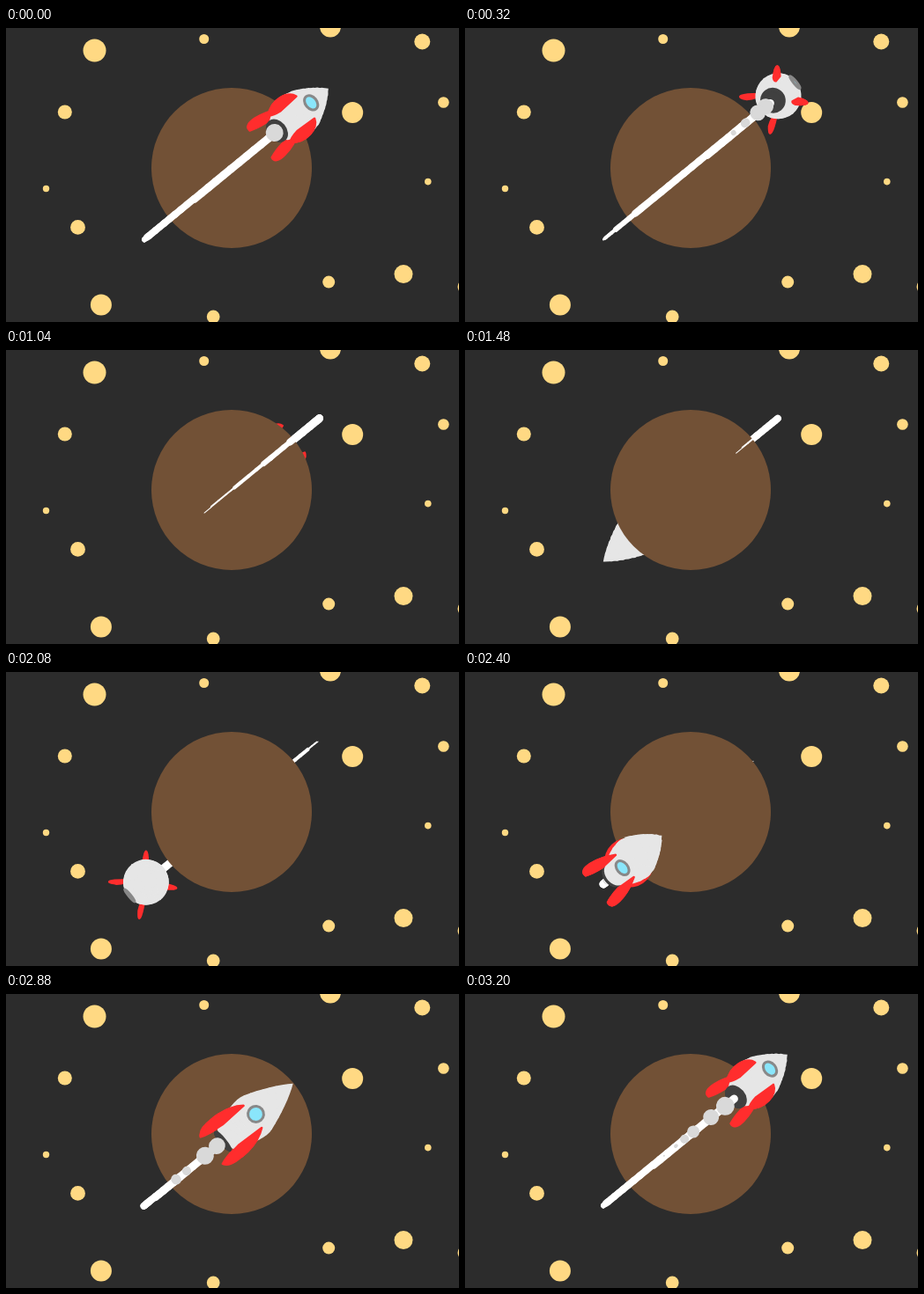
An HTML page without scripts for the animation above (3.24 s loop, 514 px wide and 334 px high).

```html
<!DOCTYPE html>
<html lang="en">
<head>
<meta charset="utf-8">
<title>Rocket orbit</title>
<style>
/* orbit angle in degrees: 0 = middle of the near side, 90 = upper right end */
@property --a { syntax: "<number>"; inherits: true; initial-value: 43.4; }
@keyframes orbit {
  from { --a: 43.4; }
  98.765%, to { --a: 403.4; }
}
html, body { margin: 0; width: 100%; height: 100%; overflow: hidden; background: #2c2c2c; }
.stage { position: relative; width: 514px; height: 334px; overflow: hidden; }
.stars { position: absolute; left: 0; top: 0; fill: #ffd983; }
.world {
  position: absolute; left: 256px; top: 158.5px; width: 0; height: 0;
  transform: rotate(-39.4deg);
  animation: orbit 3240ms linear infinite;
}
.world > * { position: absolute; }
.planet {
  left: -91.2px; top: -91.2px; width: 182.4px; height: 182.4px;
  border-radius: 50%; background: #725136; z-index: 0;
}

/* trail: capsules that lag behind the rocket */
.t {
  --l: calc(14 + var(--k) * 5);
  --u: calc(128.5 * sin((var(--a) - var(--l)) * 1deg));
  --v: calc(128.5 * sin((var(--a) - var(--l) - 5) * 1deg));
  --h: calc(9 * sin(min((180 - var(--l)) * .78, 90) * 1deg));
  left: calc((min(var(--u), var(--v)) - var(--h) / 2) * 1px);
  width: calc((max(var(--u), var(--v)) - min(var(--u), var(--v)) + var(--h)) * 1px);
  top: calc(var(--h) * -.5px);
  height: calc(var(--h) * 1px);
  border-radius: 9px; background: #fff;
  z-index: calc(100 * cos((var(--a) - var(--l)) * 1deg));
}

/* puffs: stay where they appear (--p) and shrink */
.p {
  --g: calc(var(--a) - var(--p));
  --s: clamp(0, (65 - var(--g)) / 50 * var(--r), 10.5);
  left: calc((128.5 * sin(var(--p) * 1deg) - var(--s)) * 1px);
  top: calc(var(--s) * -1px);
  width: calc(var(--s) * 2px);
  height: calc(var(--s) * 2px);
  border-radius: 50%; background: #d9d9d9;
  opacity: calc((var(--g) - 12) * 99);
  z-index: calc(100 * cos(var(--p) * 1deg) + 8);
}

.rocket {
  --c: cos(var(--a) * 1deg);
  --n: sin(var(--a) * 1deg);
  left: 0; top: 0; overflow: visible;
  z-index: calc(100 * var(--c));
}
.ship { transform: matrix(1, 0, 0, 1, calc(128.5 * var(--n)), 0); }
.body { fill: #e6e6e6; }
.hull { transform: matrix(var(--c), 0, 0, 1, 0, 0); }
.disc { transform: matrix(var(--n), 0, 0, 1, calc(var(--x) * var(--c)), 0); }
.nozzle { --x: -30; fill: #404040; stroke: #404040; stroke-width: 5; }
.nozzle.over { opacity: calc(var(--n) * 999); }
.fin {
  d: path("M12 23C-4 39 -36 45 -44 28Q-36 23 -20 21Z");
  fill: #ff2d2d; stroke: #ff2d2d; stroke-width: 2.5; stroke-linejoin: round;
  transform: matrix(var(--c), 0, calc(var(--q) * .707 * var(--n)), calc(var(--w) * .707), 0, 0);
}
.out { --q: 1; }
.in { --q: -1; }
.lo { --w: 1; }
.hi { --w: -1; }
.out.over { opacity: calc(cos((var(--a) - 10) * 1deg) * 999); }
.in.over { opacity: calc(cos((var(--a) - 170) * 1deg) * 999); }
.window {
  fill: #8ae6fb; stroke: #888; stroke-width: 3;
  transform: matrix(var(--c), 0, 0, 1, calc(15.7 * var(--c) + 24.5 * var(--n)), 0);
  opacity: calc(var(--c) * 999);
}
.fin, .nozzle, .window { vector-effect: non-scaling-stroke; }
</style>
</head>
<body>
<div class="stage">
  <svg class="stars" width="514" height="334">
    <circle cx="100.5" cy="25.5" r="13"/><circle cx="224.7" cy="12.5" r="5.5"/>
    <circle cx="368" cy="-1.5" r="12"/><circle cx="472.3" cy="15.5" r="9"/>
    <circle cx="496.4" cy="84.5" r="6.3"/><circle cx="66.8" cy="95.5" r="8"/>
    <circle cx="393.2" cy="96" r="12"/><circle cx="45.5" cy="182.5" r="3.7"/>
    <circle cx="478.8" cy="174.6" r="3.8"/><circle cx="81.5" cy="226.4" r="8.4"/>
    <circle cx="366.2" cy="288.6" r="7"/><circle cx="451" cy="279.6" r="10.5"/>
    <circle cx="107.9" cy="314.4" r="12"/><circle cx="235.2" cy="328" r="7.4"/>
    <circle cx="520.5" cy="294" r="8"/>
  </svg>
  <div class="world">
    <div class="planet"></div>

    <i class="t" style="--k:0"></i><i class="t" style="--k:1"></i><i class="t" style="--k:2"></i>
    <i class="t" style="--k:3"></i><i class="t" style="--k:4"></i><i class="t" style="--k:5"></i>
    <i class="t" style="--k:6"></i><i class="t" style="--k:7"></i><i class="t" style="--k:8"></i>
    <i class="t" style="--k:9"></i><i class="t" style="--k:10"></i><i class="t" style="--k:11"></i>
    <i class="t" style="--k:12"></i><i class="t" style="--k:13"></i><i class="t" style="--k:14"></i>
    <i class="t" style="--k:15"></i><i class="t" style="--k:16"></i><i class="t" style="--k:17"></i>
    <i class="t" style="--k:18"></i><i class="t" style="--k:19"></i><i class="t" style="--k:20"></i>
    <i class="t" style="--k:21"></i><i class="t" style="--k:22"></i><i class="t" style="--k:23"></i>
    <i class="t" style="--k:24"></i><i class="t" style="--k:25"></i><i class="t" style="--k:26"></i>
    <i class="t" style="--k:27"></i><i class="t" style="--k:28"></i><i class="t" style="--k:29"></i>
    <i class="t" style="--k:30"></i><i class="t" style="--k:31"></i><i class="t" style="--k:32"></i>

    <i class="p" style="--p:29.3;--r:10"></i><i class="p" style="--p:39;--r:11"></i>
    <i class="p" style="--p:50;--r:12"></i><i class="p" style="--p:59;--r:10"></i>
    <i class="p" style="--p:69;--r:8"></i><i class="p" style="--p:80;--r:6"></i>
    <i class="p" style="--p:111;--r:6"></i>
    <i class="p" style="--p:288;--r:6"></i><i class="p" style="--p:296;--r:8"></i>
    <i class="p" style="--p:306;--r:12"></i><i class="p" style="--p:320.7;--r:16"></i>
    <i class="p" style="--p:329.2;--r:9"></i><i class="p" style="--p:342.5;--r:12.5"></i>
    <i class="p" style="--p:350.3;--r:9.6"></i><i class="p" style="--p:356;--r:14"></i>
    <i class="p" style="--p:361.7;--r:15"></i><i class="p" style="--p:373.6;--r:13"></i>
    <i class="p" style="--p:383.3;--r:12"></i>

    <svg class="rocket" width="1" height="1">
      <g class="ship">
        <circle class="disc nozzle" r="12"/>
        <path class="fin in hi"/><path class="fin in lo"/>
        <path class="fin out hi"/><path class="fin out lo"/>
        <g class="body">
          <path class="hull" d="M74 0C62 9 40 19 22 25Q8 30 -26 14.5V-14.5Q8 -30 22 -25C40 -19 62 -9 74 0Z"/>
          <circle class="disc" style="--x:-26" r="14.5"/>
          <circle class="disc" style="--x:-18" r="18"/>
          <circle class="disc" style="--x:-10" r="21"/>
          <circle class="disc" style="--x:-3" r="23.3"/>
          <circle class="disc" style="--x:4" r="25"/>
          <circle class="disc" style="--x:13" r="26"/>
          <circle class="disc" style="--x:22" r="25"/>
          <circle class="disc" style="--x:29" r="22.5"/>
          <circle class="disc" style="--x:36" r="19.8"/>
          <circle class="disc" style="--x:43" r="16.9"/>
          <circle class="disc" style="--x:50" r="13.7"/>
          <circle class="disc" style="--x:57" r="10.2"/>
          <circle class="disc" style="--x:64" r="6.4"/>
        </g>
        <circle class="disc nozzle over" r="12"/>
        <path class="fin in hi over"/><path class="fin in lo over"/>
        <path class="fin out hi over"/><path class="fin out lo over"/>
        <circle class="window" r="9"/>
      </g>
    </svg>
  </div>
</div>
</body>
</html>
```
